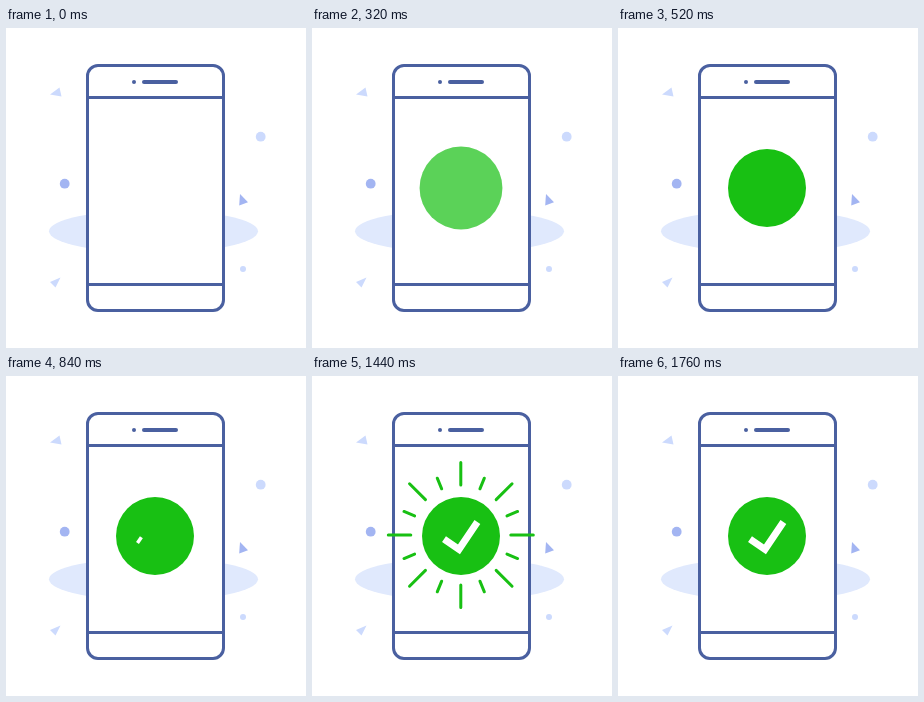
Recreate the animation shown at these times as an HTML page. Size 300 by 320 pixels, loop 3920 ms.

```html
<!DOCTYPE html>
<html lang="en">
<head>
<meta charset="utf-8">
<title>Phone check</title>
<style>
  html, body { margin: 0; width: 100%; height: 100%; overflow: hidden; background: #fff; }
  svg { display: block; width: 100%; height: 100%; }
</style>
</head>
<body>
<svg viewBox="0 0 300 320">
  <ellipse cx="147.5" cy="203.3" rx="104.5" ry="21.5" fill="#e0e9fd"/>
  <g fill="#ccdafd">
    <path d="M44 66.5L53.5 59.5L55.5 68.5Z"/>
    <circle cx="254.7" cy="108.7" r="4.9"/>
    <circle cx="237" cy="241" r="3"/>
    <path d="M44 254L54.5 249.5L49.5 259.5Z"/>
  </g>
  <g fill="#a3b5f2">
    <circle cx="58.7" cy="155.7" r="4.9"/>
    <path d="M234 166L242 174.2L233.2 177.5Z"/>
  </g>
  <g stroke="#4a60a0" stroke-width="3" fill="none">
    <rect x="81.5" y="37.5" width="136" height="245" rx="10.5" fill="#fff"/>
    <path d="M81.5 69.5H217.5M81.5 256.5H217.5"/>
    <path d="M138 54H170" stroke-width="4" stroke-linecap="round"/>
    <circle cx="128" cy="54" r="2" fill="#4a60a0" stroke="none"/>
  </g>
  <path id="rays" fill="none" stroke="#18c013" stroke-width="3" stroke-linecap="round"/>
  <circle id="disc" cx="149" cy="160" r="0" fill="#18c013"/>
  <path id="check" d="M132 163.2L147 173.3L165.4 146" fill="none" stroke="#fff" stroke-width="7"/>
</svg>
<script>
  const LOOP = 3920, STEP = 40, RADIUS = 39;
  const RAYS = { count: 16, x: 148.8, y: 159, inner: 50, long: 22.5, short: 11.5 };
  const disc = document.getElementById('disc');
  const check = document.getElementById('check');
  const rays = document.getElementById('rays');
  const checkLength = check.getTotalLength();

  const mix = (a, b, k) => a + (b - a) * k;
  const span = (t, from, to) => Math.min(1, Math.max(0, (t - from) / (to - from)));
  const easeOut = k => 1 - (1 - k) ** 2;
  const smooth = k => k * k * (3 - 2 * k);

  function drawDisc(t) {
    const scale = t < 400
      ? mix(0.5, 1.1, easeOut(span(t, 80, 400)))
      : mix(1.1, 1, smooth(span(t, 400, 520)));
    disc.setAttribute('r', RADIUS * scale);
    disc.setAttribute('opacity', span(t, 80, 420));
  }

  function drawCheck(t) {
    const shown = span(t, 805, 1320);
    check.setAttribute('visibility', shown > 0 ? 'visible' : 'hidden');
    check.setAttribute('stroke-dasharray', shown < 1 ? `${shown * checkLength} 100` : 'none');
  }

  function rayPath(head, tail) {
    const point = (angle, r) => `${RAYS.x + r * Math.cos(angle)} ${RAYS.y + r * Math.sin(angle)}`;
    let path = '';
    for (let i = 0; i < RAYS.count; i++) {
      const angle = i * 2 * Math.PI / RAYS.count;
      const length = i % 2 ? RAYS.short : RAYS.long;
      path += `M${point(angle, RAYS.inner + length * tail)}L${point(angle, RAYS.inner + length * head)}`;
    }
    return path;
  }

  // Rays grow outward, then their inner ends catch up
  function drawRays(t) {
    const head = span(t, 1320, 1440), tail = span(t, 1440, 1760);
    rays.setAttribute('d', head > 0 && tail < 1 ? rayPath(head, tail) : '');
  }

  function render(time) {
    const t = Math.floor((time % LOOP) / STEP) * STEP;
    drawDisc(t);
    drawCheck(t);
    drawRays(t);
  }

  const start = performance.now();
  function tick() {
    render(performance.now() - start);
    requestAnimationFrame(tick);
  }
  tick();
</script>
</body>
</html>
```
